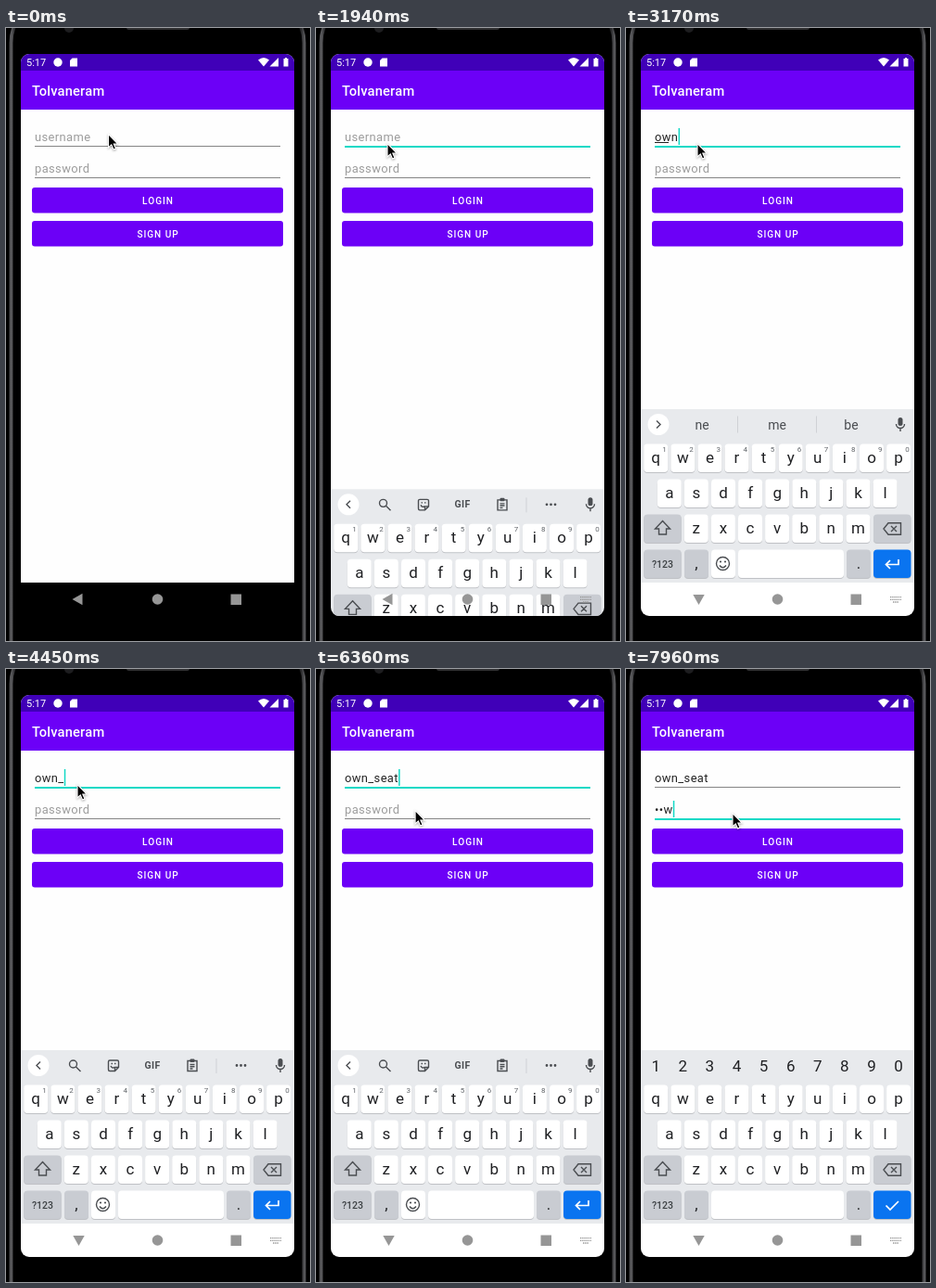
Animation of 328x661 px, one loop 8000 ms. Source, as an HTML page:

```html
<!DOCTYPE html>
<html lang="en">
<head>
<meta charset="utf-8">
<title>Login form</title>
<style>
html, body { margin: 0; width: 100%; height: 100%; overflow: hidden; background: #000; }
svg { display: block; width: 328px; height: 661px; font-family: Roboto, sans-serif; }
.field { font-size: 12.9px; letter-spacing: .4px; white-space: pre; }
.button { font-size: 10.1px; font-weight: 500; letter-spacing: .95px; fill: #fff; }
.mid { text-anchor: middle; }
.letter { font-size: 17px; fill: #202124; }
.hint { font-size: 8px; fill: #5f6368; }
.word { font-size: 14px; fill: #4a4d51; }
.line { fill: none; stroke: #4a4d51; stroke-width: 1.4; }
.white { stroke: #fff; stroke-width: 1.7; }
</style>
</head>
<body>
<svg viewBox="0 0 328 661">
  <defs>
    <clipPath id="screen"><rect x="16" y="28" width="295" height="606" rx="9"/></clipPath>
    <linearGradient id="rim" gradientUnits="userSpaceOnUse" x1="0" x2="328" y1="0" y2="0">
      <stop offset="0" stop-color="#2c2c2e"/><stop offset=".018" stop-color="#5c5c5f"/>
      <stop offset=".03" stop-color="#242426"/><stop offset=".97" stop-color="#242426"/>
      <stop offset=".983" stop-color="#5c5c5f"/><stop offset="1" stop-color="#2c2c2e"/>
    </linearGradient>
  </defs>
  <rect width="328" height="661"/>
  <path d="M10 -4Q5.5 5 5.5 16V661M317 -4Q321.500 5 321.500 16V661" fill="none" stroke="url(#rim)" stroke-width="4"/>
  <circle cx="68" cy="0" r="5" fill="#1d1d1f"/>
  <rect x="130" y="-3" width="68" height="5" rx="2.500" fill="#2e2e30"/>

  <g clip-path="url(#screen)">
    <rect x="16" y="28" width="295" height="570" fill="#fefefe"/>
    <rect x="16" y="28" width="295" height="18" fill="#4000b8"/>
    <rect x="16" y="46" width="295" height="42" fill="#6c00f7"/>
    <g fill="#fff">
      <text x="22" y="41" font-size="11">5:17</text>
      <circle cx="56" cy="37" r="4.700"/>
      <path d="M71.500 32.500H77V41.500H69V35z"/>
      <path d="M272 34.500Q278 29.500 284 34.500L278 41.500z"/>
      <path d="M294 32V41.500H284.500z"/>
      <path d="M299.500 33H301V32H303V33H304.500V41.500H299.500z"/>
      <text x="28" y="73" font-size="14.700" font-weight="500" letter-spacing=".2">Tolvaneram</text>
    </g>
    <g fill="#6c00f7">
      <rect x="28" y="172" width="271" height="27.500" rx="3"/>
      <rect x="28" y="208" width="271" height="27.500" rx="3"/>
    </g>
    <text class="button mid" x="164" y="190">LOGIN</text>
    <text class="button mid" x="164" y="226">SIGN UP</text>
    <g id="fields"></g>

    <rect x="16" y="598" width="295" height="36"/>
    <g id="keyboard">
      <rect x="16" y="411" width="295" height="187" fill="#e8eaed"/>
      <rect x="16" y="598" width="295" height="36" fill="#fff"/>
      <g id="tools">
        <circle cx="35" cy="427.500" r="11.500" fill="#fff"/>
        <path id="chevron" class="line" d="M37 423.500l-4 4 4 4"/>
        <g id="icons">
          <path class="line" d="M76.500 426a4 4 0 1 0 -8 0a4 4 0 1 0 8 0M75.500 429l5 5"/>
          <path class="line" d="M112 422h8q1.500 0 1.500 1.500v6l-4 4h-5.500q-1.500 0 -1.500 -1.500v-8.500q0 -1.500 1.500 -1.500M121 429.500h-3.500v3.500M113 428q1.500 3 4 1.500M113.500 425.500h1.500M117 425.500h1.500"/>
          <text class="mid" x="158" y="431" font-size="10.500" font-weight="700" letter-spacing=".4" fill="#4a4d51">GIF</text>
          <path class="line" d="M196 422.500h10v11h-10zM198.500 426.500h5M198.500 428.700h5M198.500 431h3"/>
          <rect x="198.500" y="420.500" width="5" height="3.500" rx="1" fill="#4a4d51"/>
          <path d="M227 420v16" stroke="#cfd1d5"/>
          <path d="M249 427.500h.01M253.500 427.500h.01M258 427.500h.01" stroke="#4a4d51" stroke-width="2.800" stroke-linecap="round"/>
        </g>
        <g id="words"><path d="M120.500 418.500v18M205.500 418.500v18" stroke="#cfd1d5"/></g>
        <rect x="293.500" y="420" width="5" height="9" rx="2.500" fill="#4a4d51"/>
        <path class="line" d="M291.500 427a4.500 4.500 0 0 0 9 0M296 431.500v3.500"/>
      </g>
      <g id="keys"></g>
      <path id="shift" class="line" d="M39.500 531.500l8 8.500h-4v6h-8v-6h-4z"/>
      <path class="line" d="M278 540l5 -6.200h13.500v12.400h-13.500zM286 537l6 6M292 537l-6 6"/>
      <text class="mid" x="39.500" y="582" font-size="10.500" font-weight="500" fill="#3c4043">?123</text>
      <text class="letter mid" x="76" y="583">,</text>
      <text class="letter mid" x="251" y="583">.</text>
      <g id="textMode">
        <path class="line" d="M111.500 577.500a7 7 0 1 0 -14 0a7 7 0 1 0 14 0M101 579.500q3.500 4.500 7 0"/>
        <path d="M102 575.500h.01M107 575.500h.01" stroke="#4a4d51" stroke-width="2.200" stroke-linecap="round"/>
        <path class="line white" d="M294 573v5.500h-13.500M285 574l-4.500 4.500 4.500 4.500"/>
      </g>
      <path id="check" class="line white" d="M280.500 578.500l4.500 4.500 9 -9"/>
    </g>

    <g fill="#969696">
      <path id="back" d="M-6 0L5 -6.200V6.200z"/>
      <circle cx="163.500" cy="616" r="5.800"/>
      <rect x="242.500" y="610.500" width="11.500" height="11.500"/>
    </g>
    <path id="imeIcon" d="M285 613.700h12M285 616.300h12M288 619h6" fill="none" stroke="#969696" stroke-width="1.300" stroke-dasharray="1.400 .8"/>
  </g>
  <path id="mouse" d="M0 0V14.500L3.300 11.400L5.600 16.600L8 15.600L5.800 10.500H10.300z" stroke="#fff" stroke-width="1.100" style="filter: drop-shadow(0 1px 1px #0005)"/>
</svg>
<script>
const $ = id => document.getElementById(id);
const NS = 'http://www.w3.org/2000/svg';
const LOOP = 8000, TEAL = '#12d9c6';

function add(parent, tag, attrs, text = '') {
  const el = document.createElementNS(NS, tag);
  for (const k in attrs) el.setAttribute(k, attrs[k]);
  el.textContent = text;
  return parent.appendChild(el);
}
const label = (parent, x, y, text, cls) => add(parent, 'text', { x, y, class: cls + ' mid' }, text);
const show = (el, on) => el.setAttribute('display', on ? 'inline' : 'none');
const ramp = (t, a, b) => Math.min(1, Math.max(0, (t - a) / (b - a)));
const within = (t, spans) => spans.some(([a, b]) => t >= a && t < b);
// last value of a [time, value] list that has begun
const at = (t, steps) => steps.reduce((v, s) => t >= s[0] ? s[1] : v, '');

// keyboard
const letters = [], textKeys = [], passKeys = [];
function key(x, y, w, fill = '#fff') {
  const g = add($('keys'), 'g', {});
  add(g, 'rect', { x, y: y + 1, width: w, height: 30.5, rx: 4, fill: '#bfc1c5' });
  add(g, 'rect', { x, y, width: w, height: 30.5, rx: 4, fill });
  return g;
}
const digits = add($('keyboard'), 'g', {});
['qwertyuiop', 'asdfghjkl', 'zxcvbnm'].forEach((row, r) => {
  [...row].forEach((c, i) => {
    const x = [32.2, 46.8, 75.8][r] + i * 29.1, y = 448.5 + r * 38;
    const g = key(x - 13, y, 26);
    letters.push([c, label(g, x, y + 20.5, c, 'letter')]);
    if (r) return;
    const n = (i + 1) % 10;
    textKeys.push(label(g, x + 9.3, y + 8.5, n, 'hint'));
    label(digits, x, 434, n, 'letter');
  });
});
const GRAY = '#c9ccd2';
key(19.2, 524.5, 40.5, GRAY);
key(267, 524.5, 40.5, GRAY);
key(19.2, 562.5, 40.5, GRAY);
key(63, 562.5, 26, GRAY);
key(238, 562.5, 26, GRAY);
key(267, 562.5, 40.5, '#0a74f0');
textKeys.push(key(92, 562.5, 26), key(121, 562.5, 114), $('textMode'), $('tools'));
passKeys.push(key(92, 562.5, 143), digits, $('check'));
const words = [82, 163, 243].map(x => label($('words'), x, 433, '', 'word'));

// form fields
function field(y, hint) {
  const g = $('fields');
  add(g, 'path', { d: `M31 ${y + 5.5}H296`, stroke: '#858585' });
  const teal = add(g, 'path', { d: `M31 ${y + 6}H296`, stroke: TEAL, 'stroke-width': 2 });
  const text = add(g, 'text', { x: 31, y, class: 'field' });
  const caret = add(g, 'rect', { y: y - 14, width: 1.5, height: 18, fill: TEAL });
  return (value, focus, blink) => {
    text.textContent = value || hint;
    text.setAttribute('fill', value ? '#222' : '#9c9c9c');
    teal.setAttribute('opacity', focus);
    caret.setAttribute('x', 31.2 + (value ? text.getComputedTextLength() : 0));
    show(caret, blink);
  };
}
const user = field(122, 'username'), pass = field(156, 'password');
const compose = add($('fields'), 'path', { stroke: '#222' });

const typed = [[3010, 'o'], [3100, 'ow'], [3170, 'own'], [4250, 'own_'], [5530, 'own_s'],
  [5620, 'own_se'], [5830, 'own_sea'], [5920, 'own_seat']];
const secret = [[7720, 'n'], [7870, '•e'], [7960, '••w']];
const userBlink = [[1440, 1910], [2390, 2860], [3010, 3860], [4220, 4960], [5470, 6420]];
const passBlink = [[6700, 7210], [7720, LOOP]];
const path = [[330, 110.5, 114.5], [620, 105, 118.5], [1130, 105, 118.5], [1270, 77, 124.5],
  [6250, 77, 124.5], [6360, 107, 152.5], [6480, 115, 155.5]];

function pointer(t) {
  let [, x, y] = path[0];
  for (let i = 1; i < path.length; i++) {
    const p = ramp(t, path[i - 1][0], path[i][0]);
    x += (path[i][1] - path[i - 1][1]) * p;
    y += (path[i][2] - path[i - 1][2]) * p;
  }
  return `translate(${x} ${y})`;
}

function draw(t) {
  const passFocus = ramp(t, 6630, 6710);
  user(at(t, typed), ramp(t, 1365, 1440) * (1 - passFocus), within(t, userBlink));
  pass(at(t, secret), passFocus, within(t, passBlink));
  const end = at(t, [[3040, 39], [3130, 46], [3380, 56], [4450, 0]]);
  compose.setAttribute('d', end ? `M31 123.500H${end}` : '');

  const rise = 1 - (1 - ramp(t, 1890, 2025)) ** 2;
  show($('keyboard'), t >= 1900);
  $('keyboard').setAttribute('transform', `translate(0 ${223 * (1 - rise)})`);
  show($('imeIcon'), t >= 1590);
  const turn = ramp(t, 2045, 2210);
  $('back').setAttribute('transform', `translate(${77.5 + turn} 616) rotate(${-90 * turn})`);

  const suggest = within(t, [[3130, 4450]]);
  show($('icons'), !suggest);
  show($('words'), suggest);
  $('chevron').setAttribute('d', suggest ? 'M33 423.500l4 4 -4 4' : 'M37 423.500l-4 4 4 4');
  const list = t < 3380 ? ['ne', 'me', 'be'] : ['own', 'owner', 'owns'];
  words.forEach((w, i) => w.textContent = list[i]);

  const upper = within(t, [[4220, 4250]]);
  letters.forEach(([c, el]) => el.textContent = upper ? c.toUpperCase() : c);
  $('shift').style.fill = upper ? '#4a4d51' : 'none';

  const passMode = t >= 6750;
  textKeys.forEach(el => show(el, !passMode));
  passKeys.forEach(el => show(el, passMode));
  $('mouse').setAttribute('transform', pointer(t));
}

function tick() {
  draw(performance.now() % LOOP);
  requestAnimationFrame(tick);
}
tick();
</script>
</body>
</html>
```
